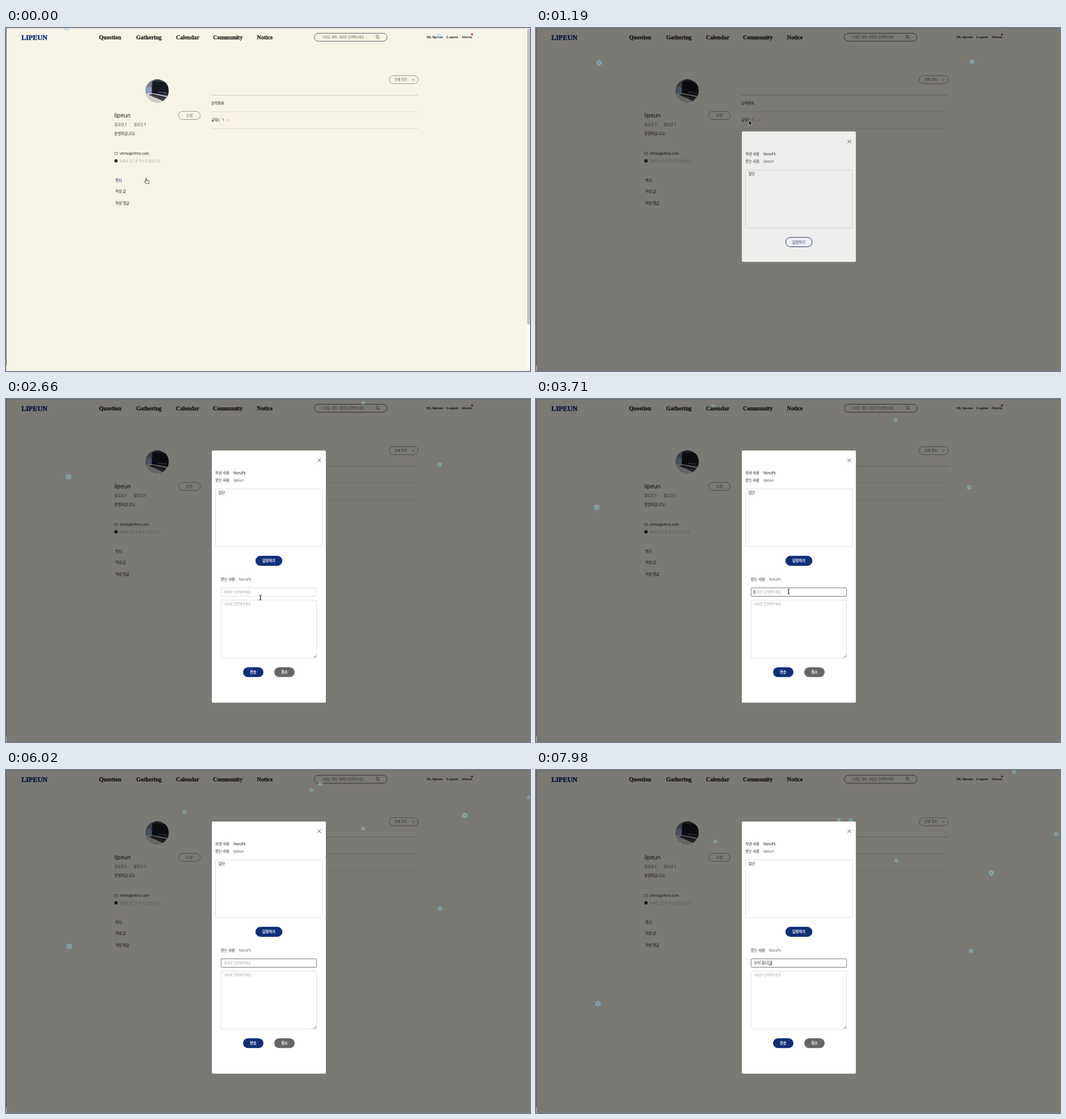
Recreate the animation shown at these times as an HTML page. Size 924 by 606 pixels, loop 8 s.

```html
<!DOCTYPE html>
<html lang="ko">
<head>
<meta charset="utf-8">
<style>
  html, body { margin: 0; width: 100%; height: 100%; overflow: hidden; background: #f7f4e7; }
  svg { display: block; width: 924px; height: 606px; }
  text { font: 6.4px Inter, "Noto Sans CJK KR", "Noto Sans CJK", sans-serif; letter-spacing: -.03em; fill: #222; white-space: pre; }
  .serif { font: bold 10.25px "Liberation Serif", serif; letter-spacing: 0; fill: #2b2826; stroke: #2b2826; stroke-width: .3; }
  .logo { font-size: 12.2px; fill: #112f78; stroke: #112f78; stroke-width: .45; }
  .user { font-size: 6.8px; stroke-width: 0; }
  .strong { font-weight: 500; fill: #111; }
  .small { font-size: 5.75px; }
  .soft { fill: #666; }
  .faint { fill: #a9a79f; }
  .mid { text-anchor: middle; }
  .navy { fill: #112f78; font-weight: 500; }
  .white { fill: #fff; font-weight: 600; }
  .line { fill: none; stroke: #85837c; stroke-width: .8; }
  .dark { stroke: #3d4257; }
  .box { fill: #fff; stroke: #dcdcdc; stroke-width: .9; }
</style>
</head>
<body>
<svg viewBox="0 0 924 606">
  <defs>
    <clipPath id="round"><circle cx="266.7" cy="111" r="20.4"/></clipPath>
    <g id="flake" fill="none" stroke="#84cfe8" stroke-width=".19" opacity=".85"><circle r=".42"/></g>
  </defs>

  <rect width="924" height="606" fill="#f7f4e7"/>
  <rect width="924" height="1" opacity=".12"/>

  <!-- header -->
  <text class="serif logo" x="27" y="20.6">LIPEUN</text>
  <text class="serif" x="164" y="19.6">Question</text>
  <text class="serif" x="229.5" y="19.6">Gathering</text>
  <text class="serif" x="299.8" y="19.6">Calendar</text>
  <text class="serif" x="365" y="19.6">Community</text>
  <text class="serif" x="442.5" y="19.6">Notice</text>
  <rect class="line dark" x="543.5" y="9.3" width="128.5" height="14" rx="7"/>
  <text class="soft" x="557" y="18.2" style="font-size:5.4px">닉네임, 제목, 내용을 검색해보세요</text>
  <path class="line dark" d="M657.4 15.2a2.4 2.4 0 1 0-4.8 0a2.4 2.4 0 1 0 4.8 0M656.7 17l2.2 2.2"/>
  <text class="serif user" x="741.5" y="18.2">Hi, lipeun</text>
  <text class="serif user" x="776.5" y="18.2">Logout</text>
  <text class="serif user" x="803" y="18.2">Alarm</text>
  <circle cx="821.8" cy="11.4" r="1.8" fill="#d2373b"/>

  <!-- profile -->
  <g clip-path="url(#round)">
    <rect x="246" y="90" width="42" height="42" fill="#3a3f4b"/>
    <path d="M246 90h15l-3 26-12 3z" fill="#777d89"/>
    <path d="M246 106l8-3 4 5-2 8-10 5z" fill="#8da2c2"/>
    <path d="M258 94l28 2v22l-29-3z" fill="#161921"/>
    <path d="M268 113l16 2" stroke="#6782ad"/>
    <path d="M246 116l11-1 31 6v12h-42z" fill="#cfcecd"/>
    <path d="M252 118l6-1.500 25 5.500-6 7z" fill="#2b2d35"/>
    <path d="M253 120l24 7M256 119l23 6" stroke="#aaa" stroke-width=".6" stroke-dasharray="2 1"/>
  </g>
  <text x="191" y="157.8" style="font-size:10px;letter-spacing:0">lipeun</text>
  <rect class="line" x="304.3" y="147.3" width="38.2" height="14.2" rx="7.1"/>
  <text class="mid soft" x="323.3" y="156.6">수정</text>
  <text class="soft" x="191" y="172.8">팔로워 <tspan fill="#222">1</tspan></text>
  <text class="soft" x="225" y="172.8">팔로잉 <tspan fill="#222">1</tspan></text>
  <text x="191" y="188.9">운영자입니다/.</text>
  <path class="line" d="M191.3 219.6h5.6v4.4h-5.6zl2.8 2.5 2.8-2.5"/>
  <text x="200.3" y="224.2" style="font-size:6.3px">vhrns@vhrns.com</text>
  <circle cx="194" cy="234.8" r="3" fill="#333"/>
  <text class="small faint" x="200.3" y="237.2">등록된 모드루 주소가 없습니다.</text>
  <text class="navy" x="192.8" y="271.5">쪽지</text>
  <text x="192.8" y="291.4">작성 글</text>
  <text x="192.8" y="311.8">작성 댓글</text>

  <!-- message list -->
  <rect class="line" x="675.8" y="84.2" width="51" height="14.2" rx="7.1"/>
  <text class="soft" x="685" y="93.2" style="font-size:5.9px">전체 쪽지</text>
  <path class="line dark" d="M716.2 90.4l2 2.1 2-2.1"/>
  <path d="M362 118.500h365" stroke="#c0bdb4" stroke-width=".9"/>
  <path d="M362 148h365M362 177.500h365" stroke="#d9d6cb" stroke-width=".9"/>
  <text class="strong" x="362" y="135.2">눈이와요</text>
  <text class="strong" x="362" y="164.7">굳둑ㄷㄱ</text>
  <text x="390.3" y="164.5" style="font-size:6px;fill:#e88a85">X</text>

  <g id="scrollbar">
    <rect x="918" width="6" height="606" fill="#fafaf8"/>
    <rect x="919" y="1" width="5" height="523" rx="2.5" fill="#c1c1c1"/>
  </g>
  <rect id="shade" width="924" height="606"/>
  <rect width="1" height="596" fill="#56565a"/>
  <rect y="596" width="1" height="10" fill="#c4c3bd"/>

  <!-- dialog -->
  <g id="dialog">
    <rect id="panel" x="363" width="201" rx="2" fill="#fff"/>
    <g id="message">
      <path d="M549.4 213.4l6.2 6.2m0-6.2l-6.2 6.2" stroke="#444" stroke-width=".9"/>
      <text x="369.3" y="241.3">보낸 사람</text><text x="401" y="241.3" style="font-size:6.6px">NoruPii</text>
      <text x="369.3" y="254.2">받는 사람</text><text class="soft" x="401" y="254.2" style="font-size:6.8px">lipeun</text>
      <rect class="box" x="369.5" y="267" width="188" height="102" rx="1"/>
      <text x="374.5" y="276">일단</text>
      <rect id="replyButton" x="440.3" y="385.8" width="46.6" height="16.6" rx="8.3" stroke="#112f78"/>
      <text id="replyLabel" class="mid" x="463.4" y="396.4">답장하기</text>
    </g>
    <g id="reply">
      <text x="379" y="320.9">받는 사람</text><text class="soft" x="410.5" y="320.9" style="font-size:6.6px">NoruPii</text>
      <rect id="field" class="box" x="379.2" y="333.7" width="168.5" height="14.8" rx="1.5"/>
      <text id="hint" class="small faint" x="384.3" y="343.1">제목을 입력해주세요.</text>
      <text id="typed" x="384.5" y="343.3" style="font-size:6.5px"></text>
      <rect id="underline" y="344.4" height=".7" fill="#222"/>
      <rect id="caret" y="337.2" width=".8" height="7.6" fill="#111"/>
      <rect class="box" x="379.2" y="355.3" width="168.3" height="102.6" rx="1"/>
      <text class="small faint" x="384.3" y="364.4">내용을 입력해주세요.</text>
      <path d="M542.8 456.8l4-4m-1.6 4l1.6-1.6" stroke="#444" stroke-width=".8"/>
      <rect x="418" y="474" width="36" height="17.2" rx="8.6" fill="#112f78"/><text class="mid white" x="435.8" y="484.7">전송</text>
      <rect x="473" y="474" width="36" height="17.2" rx="8.6" fill="#666"/><text class="mid white" x="491" y="484.7">취소</text>
    </g>
  </g>

  <g id="snow"></g>

  <g id="pointer">
    <path id="arrow" d="M0 0v8l1.8-1.6 1.3 2.8 1.5-.7-1.3-2.7h2.5z" stroke="#fff" stroke-width=".5"/>
    <path id="hand" d="M-.9.7c0-1 1.6-1 1.6 0v3l3.2.7c.9.3 1.1.9 1 1.7l-.7 3.3h-4.6l-2.8-3.2c-.6-.9.5-1.7 1.2-1.1l1.1.9z" fill="#fff" stroke="#111" stroke-width=".8"/>
    <path id="beam" d="M-2-4.3q2 0 2 1.2v6.2q0 1.2-2 1.2M2-4.3q-2 0-2 1.2v6.2q0 1.2 2 1.2" fill="none" stroke="#111" stroke-width=".9"/>
  </g>
</svg>
<script>
const LOOP = 8000, OPEN = 985, EXPAND = 2200, FOCUS = 3500, TYPE = 4700, RETYPE = 6100;
const $ = id => document.getElementById(id);
const set = (el, attrs) => { for (const key in attrs) el.setAttribute(key, attrs[key]); };
const show = (el, on) => { el.style.display = on ? '' : 'none'; };
const clamp = v => Math.max(0, Math.min(1, v));
const smooth = u => u * u * (3 - 2 * u);
const add = (parent, tag, attrs) => {
  const el = document.createElementNS('http://www.w3.org/2000/svg', tag);
  set(el, attrs);
  parent.append(el);
  return el;
};

for (let angle = 0; angle < 360; angle += 60)
  add($('flake'), 'path', { d: 'M0-.42V-1M-.3-.95L0-.65.3-.95', transform: `rotate(${angle})` });

// Column, time of entry at the top edge, fall speed in px per ms.
const flakes = [
  [110, 0, .0517], [766, -366, .0383], [632.5, 2425, .0288],
  [315, 3264, .0268], [806, 4464, .0517], [920, 4550, .033],
  [536.5, 4700, .0268], [555, 5280, .033], [846, 7870, .0288],
].map(([x, start, speed]) => ({ x, start, speed, el: add($('snow'), 'use', { href: '#flake' }) }));

// Larger flakes fall faster; all of them sway with age.
function drawFlake({ x, start, speed, el }, t) {
  const age = t - start, radius = 1.2 + 72 * speed;
  const sway = -3 * Math.cos(2 * Math.PI * age / 3600);
  show(el, age * speed > -radius);
  set(el, { transform: `translate(${x + sway} ${age * speed}) scale(${radius})` });
}

const rest = { x: 247.5, y: 265.5 };
const moves = [
  { start: 200, x: 375.5, y: 163.5 },
  { start: 1200, x: 461, y: 393 },
  { start: EXPAND, x: 445.5, y: 340 },
];

function drawPointer(t) {
  let { x, y } = rest;
  for (const move of moves) {
    const u = smooth(clamp((t - move.start) / 650));
    x += (move.x - x) * u;
    y += (move.y - y) * u;
  }
  const kind = t < 300 ? 'hand' : t < 1680 ? 'arrow' : t < EXPAND + 50 ? 'hand' : t < TYPE ? 'beam' : '';
  for (const id of ['arrow', 'hand', 'beam']) show($(id), id === kind);
  set($('pointer'), { transform: `translate(${x} ${y})` });
}

const mistake = ['s', 'sn', 'sns', 'sn', 's', ''];
const title = ['ㄴ', '누', '눈', '눈ㅇ', '눈이', '눈이 ', '눈이 ㅇ', '눈이 오', '눈이 옵', '눈이 옵ㄴ', '눈이 옵니', '눈이 옵니다'];
const typing = (states, elapsed, pace) => states[Math.min(states.length - 1, Math.floor(elapsed / pace))];

function drawField(t) {
  const text = t < TYPE ? '' : t < RETYPE ? typing(mistake, t - TYPE, 200) : typing(title, t - RETYPE, 170);
  const typed = $('typed');
  typed.textContent = text;
  const width = text ? typed.getComputedTextLength() : 0;
  const composing = /[ㄱ-힣]$/.test(text);
  const focused = t >= FOCUS;

  $('field').style.stroke = focused ? '#666' : '';
  show($('hint'), !text);
  show($('underline'), composing);
  if (composing) {
    const last = typed.getSubStringLength(text.length - 1, 1);
    set($('underline'), { x: 384.5 + width - last, width: last });
  }
  set($('caret'), { x: 384.3 + width });
  show($('caret'), focused && (text || (t - FOCUS) % 1000 < 500));
}

function draw(t) {
  const expanded = t >= EXPAND;
  show($('scrollbar'), t < OPEN);
  set($('shade'), { opacity: .5 * clamp((t - OPEN) / 150) });

  const entry = t - OPEN - 75;
  set($('dialog'), {
    opacity: clamp(entry / 150),
    transform: `translate(0 ${-50 * (1 - clamp(entry / 300)) ** 2})`,
  });
  set($('panel'), expanded ? { y: 91, height: 445.5 } : { y: 198.5, height: 230.5 });
  set($('message'), { transform: `translate(0 ${expanded ? -108.2 : 0})` });
  set($('replyButton'), { fill: expanded ? '#112f78' : '#fff' });
  set($('replyLabel'), { class: expanded ? 'mid white' : 'mid navy' });
  show($('reply'), expanded);
  if (expanded) drawField(t);

  flakes.forEach(flake => drawFlake(flake, t));
  drawPointer(t);
}

const began = performance.now();
function tick() {
  draw((performance.now() - began) % LOOP);
  requestAnimationFrame(tick);
}
tick();
</script>
</body>
</html>
```
